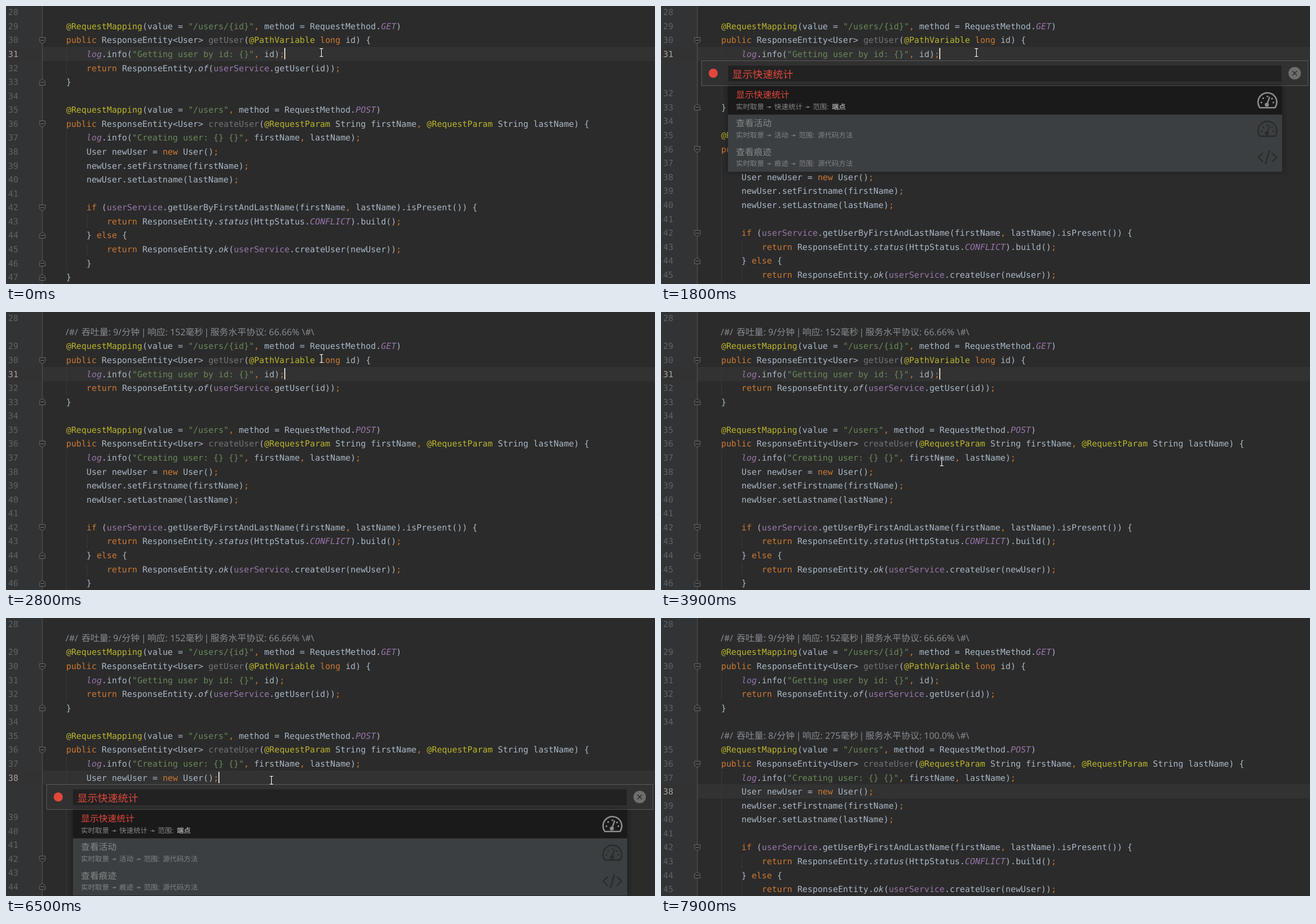
An HTML page with a canvas that plays this animation: 1143x490 px, repeating every 8000 ms.

```html
<!DOCTYPE html>
<html lang="zh-CN">
<head>
<meta charset="utf-8">
<title>Editor</title>
<style>
html, body { margin: 0; width: 100%; height: 100%; overflow: hidden; background: #2b2b2b; }
canvas { display: block; }
</style>
</head>
<body>
<canvas id="stage" width="1143" height="490"></canvas>
<script>
const W = 1143, H = 490, LOOP = 8000;
const ROW = 24.58, CHAR = 8.944, CODE_X = 106;
const MONO = '"DejaVu Sans Mono", monospace';
const SANS = '"Noto Sans", "Noto Sans CJK SC", "Noto Sans CJK JP", "DejaVu Sans", sans-serif';
const RED = '#e2473b';
const ctx = document.getElementById('stage').getContext('2d');

const FIRST = 28;
const CODE = `
@RequestMapping(value = "/users/{id}", method = RequestMethod.GET)
public ResponseEntity<User> getUser(@PathVariable long id) {
    log.info("Getting user by id: {}", id);
    return ResponseEntity.of(userService.getUser(id));
}

@RequestMapping(value = "/users", method = RequestMethod.POST)
public ResponseEntity<User> createUser(@RequestParam String firstName, @RequestParam String lastName) {
    log.info("Creating user: {} {}", firstName, lastName);
    User newUser = new User();
    newUser.setFirstname(firstName);
    newUser.setLastname(lastName);

    if (userService.getUserByFirstAndLastName(firstName, lastName).isPresent()) {
        return ResponseEntity.status(HttpStatus.CONFLICT).build();
    } else {
        return ResponseEntity.ok(userService.createUser(newUser));
    }
}`.split('\n');
const FOLD_DOWN = [30, 36, 42], FOLD_UP = [33, 44, 46, 47];

// Token rules: pattern, colour, italic
const RULES = [
  ['"[^"]*"', '#6a8759'],
  ['@\\w+', '#bbb529'],
  ['\\b(?:public|return|new|if|else|long)\\b|[,;]', '#cc7832'],
  ['\\blog\\b|\\b[A-Z]{3,}\\b', '#9876aa', true],
  ['\\buserService\\b', '#9876aa'],
  ['\\b(?:of|status|ok)(?=\\()', '#a9b7c6', true],
  ['\\b(?:getUser|createUser)(?=\\(@)', '#72737a']
];
const LEXER = new RegExp(RULES.map(r => `(${r[0]})`).join('|'), 'g');

function tokenize(line) {
  const out = [];
  let end = 0;
  const plain = to => {
    if (to > end) out.push({ col: end, text: line.slice(end, to), color: '#a9b7c6' });
  };
  for (const m of line.matchAll(LEXER)) {
    const [, color, italic] = RULES[m.slice(1).findIndex(g => g !== undefined)];
    plain(m.index);
    out.push({ col: m.index, text: m[0], color, italic });
    end = m.index + m[0].length;
  }
  plain(line.length);
  return out;
}

const LINES = CODE.map((text, i) => ({ n: FIRST + i, text, tokens: tokenize(text) }));
const STATS = { 29: ['9', '152', '66.66%'], 35: ['8', '275', '100.0%'] };
const STATS_AT = { 29: 2800, 35: 7300 };

// Command bar sessions; times in ms
const BARS = [
  { from: 500, blink: 1100, typed: 1400, still: 1800, picked: 2300, to: 2400,
    hint: '地点: WebappController.getUser(long)#31' },
  { from: 5200, blink: 5700, typed: 6000, still: 6500, picked: 6900, to: 7000,
    hint: '地点: WebappController.createUser(String,String)#38' }
];
const CARET_OFF = [[300, 500], [3000, 3500], [4000, 4300], [4900, 5200], [7900, 8000]];

// Pointer path: time, x, y
const PATH = [
  [2900, 555, 82], [3100, 560, 82], [3300, 560, 104], [3500, 550, 155],
  [3700, 524, 228], [3800, 509, 253], [3900, 494, 264], [4100, 467, 286],
  [7200, 467, 286], [7400, 5, 320], [7500, -20, 322]
];

function pointerAt(t) {
  t = Math.floor(t / 100) * 100;
  if (t <= PATH[0][0]) return PATH[0].slice(1);
  for (let i = 1; i < PATH.length; i++) {
    const [t0, x0, y0] = PATH[i - 1], [t1, x1, y1] = PATH[i];
    if (t <= t1) {
      const k = (t - t0) / (t1 - t0);
      return [x0 + (x1 - x0) * k, y0 + (y1 - y0) * k];
    }
  }
  return PATH[PATH.length - 1].slice(1);
}

function box(x, y, w, h, color) {
  ctx.fillStyle = color;
  ctx.fillRect(x, y, w, h);
}

function write(text, x, y, font, color, align = 'left') {
  ctx.font = font;
  ctx.fillStyle = color;
  ctx.textAlign = align;
  ctx.fillText(text, x, y);
}

function line(points, color, width) {
  ctx.beginPath();
  points.forEach(([x, y]) => ctx.lineTo(x, y));
  ctx.strokeStyle = color;
  ctx.lineWidth = width;
  ctx.stroke();
}

function disc(x, y, r, color) {
  ctx.beginPath();
  ctx.arc(x, y, r, 0, Math.PI * 2);
  ctx.fillStyle = color;
  ctx.fill();
}

function foldMark(y, dir) {
  ctx.beginPath();
  [[-5, -5], [5, -5], [5, 2], [0, 6], [-5, 2]].forEach(([dx, dy]) => ctx.lineTo(64 + dx, y + dy * dir));
  ctx.closePath();
  ctx.fillStyle = '#2b2b2b';
  ctx.fill();
  ctx.strokeStyle = '#686a6c';
  ctx.lineWidth = 1;
  ctx.stroke();
  line([[61, y], [67, y]], '#77797b', 1);
}

function drawStats([rate, ms, level], y) {
  const parts = [
    [105, '/#/'], [133, `吞吐量: ${rate}/分钟`], [238, '|'], [249, `响应: ${ms}毫秒`],
    [349, '|'], [360, `服务水平协议: ${level}`], [521, '\\#\\']
  ];
  for (const [x, s] of parts) write(s, x, y + 5.5, `15.8px ${SANS}`, '#868c92');
}

function drawCode(l, y, active) {
  write(l.n, 3.8, y + 5.4, `14.856px ${MONO}`, active ? '#a4a3a3' : '#606366');
  for (const k of l.tokens) {
    write(k.text, CODE_X + k.col * CHAR, y + 5.4, `${k.italic ? 'italic ' : ''}14.856px ${MONO}`, k.color);
  }
}

function gauge(x, y, color) {
  ctx.beginPath();
  ctx.arc(x, y + 3.5, 16.5, Math.PI * 0.8, Math.PI * 2.2);
  ctx.closePath();
  ctx.strokeStyle = color;
  ctx.lineWidth = 2.6;
  ctx.stroke();
  line([[x - 1, y + 8], [x + 4, y - 6]], color, 2.4);
  disc(x - 1, y + 8, 3.6, color);
  for (const a of [1, 1.25, 1.5, 1.78, 2]) {
    disc(x + 10.5 * Math.cos(a * Math.PI), y + 4 + 10.5 * Math.sin(a * Math.PI), 1.6, color);
  }
}

function brackets(x, y, color) {
  for (const s of [-1, 1]) line([[x + s * 8, y - 8], [x + s * 16, y], [x + s * 8, y + 8]], color, 2.6);
  line([[x + 3.5, y - 12], [x - 3.5, y + 12]], color, 2.6);
}

const ITEMS = [
  ['显示快速统计', '快速统计', '端点', gauge],
  ['查看活动', '活动', '源代码方法', gauge],
  ['查看痕迹', '痕迹', '源代码方法', brackets]
];

function drawPopup(y) {
  const h = 50.4, size = 12.4;
  ctx.save();
  ctx.shadowColor = 'rgba(0,0,0,.4)';
  ctx.shadowBlur = 10;
  box(118, y, 976, h * 3, '#3c3f41');
  ctx.restore();
  box(118, y, 976, h, '#1a1a1a');
  ITEMS.forEach(([title, topic, scope, icon], i) => {
    const top = y + i * h, first = i === 0;
    const gray = first ? '#85888a' : '#808385';
    write(title, 132, top + 21, `15.7px ${SANS}`, first ? RED : '#858889');
    let x = 132;
    const put = (s, step, color = gray) => {
      write(s, x, top + 40.6, `${size}px ${SANS}`, color);
      x += step;
    };
    put('实时取景', 4 * size + 4);
    put('➛', 14);
    put(topic, topic.length * size + 4);
    put('➛', 14);
    put('范围:', 33.5);
    put(scope, 0, first ? '#dedede' : gray);
    icon(1068, top + 25, first ? '#8c8c8c' : '#2a2c2d');
  });
}

function drawBar(bar, y, t) {
  box(71, y, 1068, 43, '#313131');
  ctx.strokeStyle = '#5a5a5a';
  ctx.lineWidth = 1;
  ctx.strokeRect(71.5, y - 0.5, 1068, 44);
  box(118, y + 8, 975, 28, '#222222');
  disc(92, y + 21.5, 8, RED);
  disc(1116, y + 21.5, 11, '#6e6e6e');
  for (const s of [-1, 1]) line([[1112, y + 21.5 - 4 * s], [1120, y + 21.5 + 4 * s]], '#2d2d2d', 1.6);

  const typed = t >= bar.typed;
  if (typed) write('显示快速统计', 125.5, y + 29.6, `17.9px ${SANS}`, RED);
  else write(bar.hint, 613, y + 29, `18.25px ${SANS}`, '#606060', 'center');
  if (t < bar.blink || (typed && t < bar.still)) box(typed ? 232 : 125, y + 10, 1.5, 25, '#bbbbbb');
  if (typed && t < bar.picked) drawPopup(y + 44);
}

function drawPointer(x, y) {
  x += 0.5;
  for (const [color, width] of [['#111111', 3.4], ['#f4f4f4', 1.4]]) {
    line([[x, y - 7], [x, y + 7]], color, width);
    for (const s of [-1, 1]) line([[x - 3, y + 7 * s], [x + 3, y + 7 * s]], color, width);
  }
}

function draw(t) {
  const active = t < 4300 ? 31 : 38;
  const bar = BARS.find(b => t >= b.from && t < b.to);
  let y = 10.8, barY = 0, caretY = 0;
  const placed = [];
  for (const l of LINES) {
    if (STATS[l.n] && t >= STATS_AT[l.n]) {
      placed.push({ stats: STATS[l.n], y });
      y += ROW;
    }
    placed.push({ l, y });
    if (l.n === active) {
      caretY = y;
      if (bar) {
        barY = Math.round(y + ROW / 2 + 0.2);
        y += 44.8;
      }
    }
    y += ROW;
  }

  box(0, 0, W, H, '#2b2b2b');
  box(0, 0, 64, H, '#313335');
  box(0, Math.round(caretY - ROW / 2), W, 25, '#323232');
  box(63.5, 0, 1, H, '#58595b');

  for (const p of placed) {
    if (p.stats) {
      drawStats(p.stats, p.y);
      continue;
    }
    const n = p.l.n, top = p.y - ROW / 2;
    if (n === 31 || n === 32 || (n > 36 && n < 47)) box(106, top, 1, ROW, '#393939');
    if (n === 43 || n === 45) box(142, top, 1, ROW, '#393939');
    drawCode(p.l, p.y, n === active);
    if (FOLD_DOWN.includes(n)) foldMark(Math.round(p.y) + 0.5, 1);
    if (FOLD_UP.includes(n)) foldMark(Math.round(p.y) + 0.5, -1);
  }

  if (!CARET_OFF.some(([a, b]) => t >= a && t < b)) {
    const cols = LINES[active - FIRST].text.length;
    box(Math.round(CODE_X + cols * CHAR - 0.3), Math.round(caretY - 10.3), 2, 20, '#d0d0d0');
  }
  if (bar) drawBar(bar, barY, t);
  drawPointer(...pointerAt(t));
}

ctx.textRendering = 'geometricPrecision';
ctx.lineJoin = 'round';
const start = performance.now();
function tick() {
  draw((performance.now() - start) % LOOP);
  requestAnimationFrame(tick);
}
tick();
</script>
</body>
</html>
```
